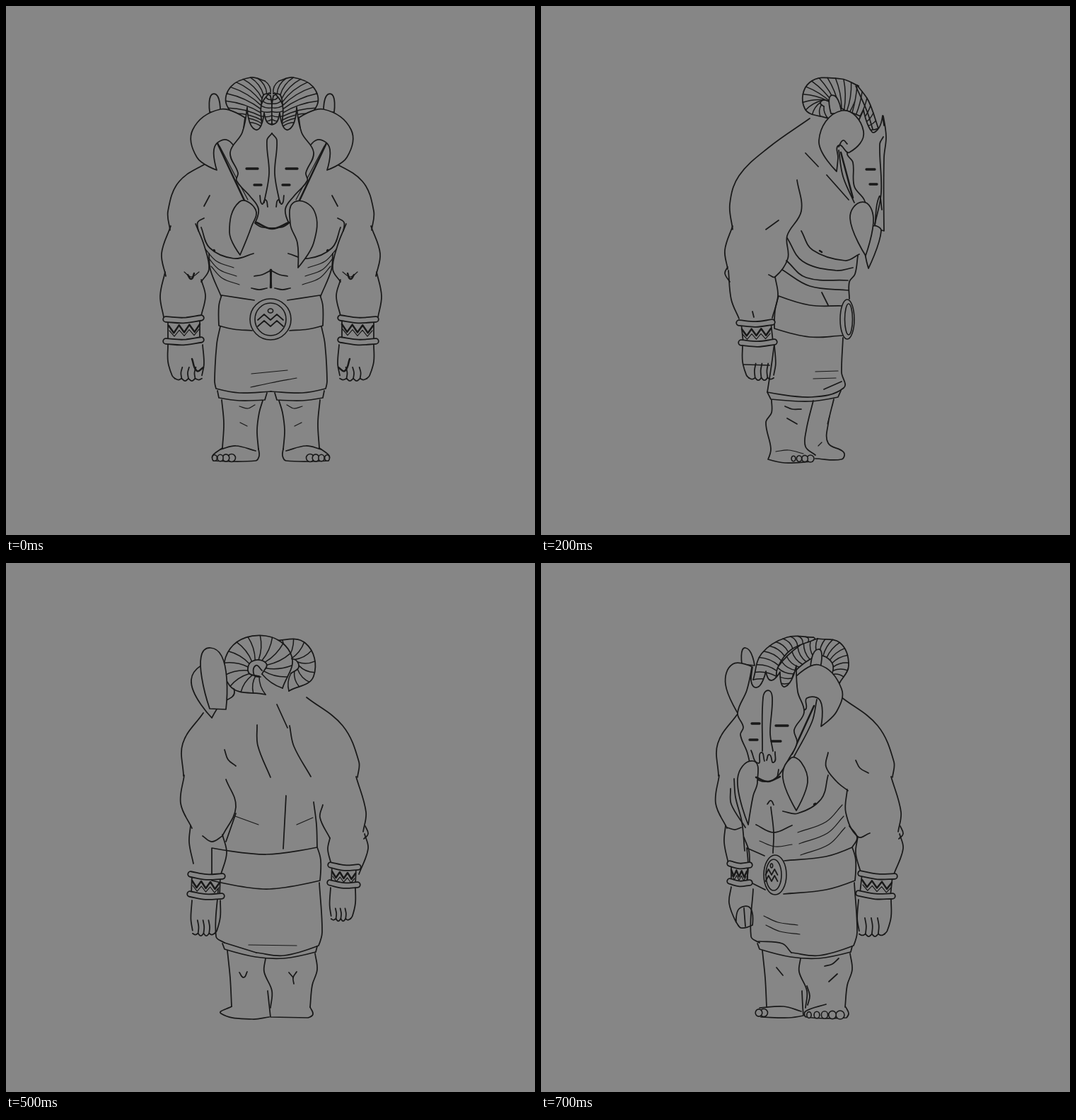
Animation, 748 px wide and 748 px high, one loop 0.8 s. Source, as an HTML page:

```html
<!DOCTYPE html>
<html lang="en">
<head>
<meta charset="utf-8">
<title>Turnaround</title>
<style>
  html, body { margin: 0; width: 100%; height: 100%; overflow: hidden; background: #868686; }
  svg { display: block; width: 100vw; height: 100vh; }
  path { stroke-linecap: round; stroke-linejoin: round; }
</style>
</head>
<body>
<svg id="stage" viewBox="0 0 748 748"></svg>
<script>
const PAPER = "#868686", INK = "#191919";
const THIN = 1.2, PLAIN = 1.75, BOLD = 2.5;
const NS = "http://www.w3.org/2000/svg";
const stage = document.getElementById("stage");
let group, axis = 0;

// "x,y x,y!" where "!" marks a corner
const read = text => text.split(" ").map(w => {
  const [x, y] = w.split(",").map(parseFloat);
  return { x, y, corner: w.endsWith("!") };
});
const flip = pts => pts.map(p => ({ ...p, x: axis - p.x }));
const shift = (pts, dx, dy) => pts.map(p => ({ ...p, x: p.x + dx, y: p.y + dy }));
const at = (x, y) => ({ x, y, corner: true });

function spline(pts, closed) {
  const n = pts.length;
  const get = i => closed ? pts[(i + n) % n] : pts[Math.max(0, Math.min(n - 1, i))];
  const handle = (i, len) => {
    const a = get(i - 1), b = get(i + 1);
    const k = get(i).corner ? 0 : len * 0.36 / (Math.hypot(b.x - a.x, b.y - a.y) || 1);
    return [(b.x - a.x) * k, (b.y - a.y) * k];
  };
  let d = `M${pts[0].x} ${pts[0].y}`;
  for (let i = 0; i < (closed ? n : n - 1); i++) {
    const p = get(i), q = get(i + 1), len = Math.hypot(q.x - p.x, q.y - p.y);
    const [ax, ay] = handle(i, len), [bx, by] = handle(i + 1, len);
    d += `C${p.x + ax} ${p.y + ay} ${q.x - bx} ${q.y - by} ${q.x} ${q.y}`;
  }
  return closed ? d + "Z" : d;
}

function add(d, width, fill = "none", stroke = INK) {
  const path = document.createElementNS(NS, "path");
  const attrs = { d, fill, stroke, "stroke-width": width };
  for (const key in attrs) path.setAttribute(key, attrs[key]);
  group.append(path);
  return path;
}

function trace(pts, width = PLAIN, closed = false) {
  for (const p of axis ? [pts, flip(pts)] : [pts])
    add(spline(p, closed), width, closed ? PAPER : "none");
}
const line = (text, width) => trace(read(text), width);
const lines = (width, ...texts) => texts.forEach(t => line(t, width));
const shape = text => trace(read(text), PLAIN, true);
const eye = (x, y, w) => trace([at(x, y), at(x + w, y)], 3.3);

// closed outline made of one half and its reflection
function whole(text) {
  const half = read(text);
  add(spline([...half, ...flip(half).reverse()], true), PLAIN, PAPER);
}

function repeat(count, dx, dy, text, width = THIN) {
  for (let i = 0; i < count; i++) trace(shift(read(text), dx * i, dy * i), width);
}

function oval(x, y, rx, ry) {
  for (const cx of axis ? [x, axis - x] : [x])
    add(`M${cx - rx} ${y}a${rx} ${ry} 0 1 1 ${2 * rx} 0a${rx} ${ry} 0 1 1 ${-2 * rx} 0Z`, 1.6, PAPER);
}

function toes(x, y, step, count, size) {
  for (let i = 0; i < count; i++) oval(x + step * i, y, size - i * 0.7, size - i * 0.4);
}

function zigzag(x, y, w, h, peaks, tilt = 0, width = BOLD) {
  const pts = [];
  for (let i = 0; i <= peaks * 2; i++)
    pts.push(at(x + w * i / peaks / 2, y + (i % 2 ? h : 0) + tilt * i / peaks / 2));
  trace(pts, width);
}

function tube(x, y, w, tilt) {
  const pts = [{ x, y }, { x: x + w / 2, y: y + tilt / 2 + 2.5 }, { x: x + w, y: y + tilt }];
  for (const p of axis ? [pts, flip(pts)] : [pts]) {
    add(spline(p), 9.4);
    add(spline(p), 5.8, "none", PAPER);
  }
}

function bracelet(x, y, w, tilt, gap, lean) {
  trace([at(x + 3, y), at(x + 3 + lean, y + gap)]);
  trace([at(x + w - 2, y + tilt), at(x + w - 2 + lean, y + gap + tilt)]);
  zigzag(x + 4, y + 9, w - 6, gap * 0.34, 3, tilt);
  zigzag(x + 5, y + 16, w - 8, gap * 0.27, 3, tilt, THIN);
  tube(x, y, w, tilt);
  tube(x + lean, y + gap, w, tilt);
}

function hand(x, y, w, h, crease = 0.3) {
  const pt = (u, v) => ({ x: x + u * w, y: y + v * h });
  trace([pt(0, 0), pt(0, 0.45), pt(0.12, 0.82), pt(0.2, 0.9)]);
  trace([pt(1, 0), pt(1.04, 0.5), pt(0.98, 0.82)]);
  for (let i = 0; i < 4; i++) {
    const u = 0.2 + 0.195 * i, drop = 0.98 - Math.abs(i - 1.5) * 0.03;
    trace([pt(u, 0.9), pt(u + 0.1, drop), pt(u + 0.195, 0.9)]);
    if (i) trace([pt(u, 0.9), pt(u - 0.02, 0.9 - crease / 2), pt(u + 0.02, 0.9 - crease)]);
  }
}

function buckle(x, y, rx, ry, rim) {
  oval(x, y, rx, ry);
  oval(x + (rx < 20 ? 2 : 0), y, rx - rim, ry - 6);
}

function emblem(x, y, w) {
  oval(x, y - 13, w / 10, 3);
  for (const dy of [-4, 5]) zigzag(x - w / 2, y + dy + 4, w, -8, 2, 0, PLAIN);
}

// ribbed horn between two edges
function braid(left, right, count, bulge) {
  for (const side of axis ? [1, -1] : [1]) {
    const edges = [left, right].map(t => spline(side > 0 ? read(t) : flip(read(t))));
    const body = add("", 0, PAPER, "none");
    const [a, b] = edges.map(d => add(d, PLAIN));
    const on = (path, u) => path.getPointAtLength(path.getTotalLength() * u);
    const near = [], far = [];
    for (let i = 0; i <= count; i++) {
      const p = on(a, i / count), q = on(b, i / count);
      const dx = q.x - p.x, dy = q.y - p.y, k = side * bulge / (Math.hypot(dx, dy) || 1);
      add(`M${p.x} ${p.y}Q${(p.x + q.x) / 2 - dy * k} ${(p.y + q.y) / 2 + dx * k} ${q.x} ${q.y}`, 1.5);
      near.push(`${p.x} ${p.y}`);
      far.unshift(`${q.x} ${q.y}`);
    }
    body.setAttribute("d", "M" + near.concat(far).join("L") + "Z");
  }
}

function front() {
  axis = 749;
  lines(PLAIN, "276,313 288,342 322,357 350,350", "287,350 289,373 304,410",
    "347,399 358,401 369,399", "351,382 362,380 374,374");
  repeat(3, 4, 12, "282,344 298,361 322,370");
  line("294,345 295,346", BOLD);
  line("374,373 375,398", BOLD);
  lines(PLAIN, "351,416 305,409! 301,424 301,452! 322,457 348,459",
    "303,453 298,478 295,530 297,541! 330,547 375,545",
    "299,544 301,554! 330,558 366,557! 369,547");
  // legs
  lines(PLAIN, "305,557 308,590 306,625", "363,558 358,575 355,600 357,627",
    "306,625 292,636 293,643! 353,643 358,636 357,626", "303,627 325,622 353,629");
  lines(THIN, "330,566 342,569 352,564", "331,589 341,594");
  toes(319, 639, -8, 4, 5.5);
  // arms
  lines(PLAIN, "291,218 245,248 229,290 232,317", "233,311 220,350 226,382",
    "225,376 218,410 223,440", "268,308 280,338 287,372 276,390",
    "276,387 282,410 276,438", "272,318 271,306 280,300", "288,268 280,283");
  line("252,376 262,383 273,376", THIN);
  line("257,380 262,386 266,378", BOLD);
  bracelet(226, 443, 50, -2, 31, 0);
  hand(229, 479, 49, 53);
  line("263,499 270,516 279,511", BOLD);
  axis = 0;
  lines(THIN, "347,520 398,515", "346,539 374,533 411,526");
  buckle(374, 443, 29, 29, 7);
  emblem(374, 444, 36);
  // head
  axis = 752;
  braid("338,165 312,140 318,114 346,101 366,106", "363,172 361,145 364,126 374,124", 11, -6);
  braid("362,170 361,140 372,123", "376,166 376,140 374,127", 7, 3);
  shape("303,150! 294,124 288,150!");
  shape("338,158! 303,146 264,175 270,214 298,232! 295,199 314,190 330,215!");
  line("299,194 314,226 338,277", BOLD);
  line("302,198 342,274", THIN);
  whole("376,168! 369,164 365,151! 353,175 341,143! 334,179 317,207 328,236 326,247 345,269 357,287 352,307! 363,313");
  lines(PLAIN, "376,180 369,190 372,237 365,278", "359,268 362,280 367,274 370,284");
  eye(340, 230, 16);
  eye(351, 253, 10);
  axis = 0;
  line("354,306 376,315 400,306", BOLD);
  shape("331,352! 316,320 330,277 353,288 347,312");
  shape("402,308 408,277 436,290 435,335 413,370! 412,335");
}

// outline common to both three-quarter views
function hull() {
  axis = 0;
  lines(PLAIN, "328,190 277,230 254,281 256,303", "258,302 244,352 248,380",
    "245,372 241,383 247,390", "246,383 241,404 254,440",
    "474,212 503,255 502,301", "501,300 506,340 490,375", "492,371 494,395 488,425",
    "310,452 306,522 311,541! 360,555 399,551", "453,461 456,528 444,537",
    "316,552 313,575 320,597 323,628", "440,548 436,587 434,627",
    "313,542 315,550! 360,559 400,557 444,546! 447,538",
    "386,559 388,578 377,605 379,629");
}

function quarter() {
  hull();
  lines(PLAIN, "347,268 350,288 335,309 319,322", "347,300 357,334 390,354 411,351",
    "424,342 428,336 433,341", "428,345 424,381 425,410", "398,371 424,381 449,370",
    "480,305 478,331 469,366 465,407", "317,372 306,388 313,402");
  repeat(3, -2, 16, "327,342 350,366 390,381");
  lines(THIN, "398,398 422,401 444,393");
  line("365,340 367,341", BOLD);
  lines(PLAIN, "409,421 350,415 313,402! 308,420 309,449! 350,462 410,468",
    "437,414 462,403! 460,430 462,449! 436,462");
  buckle(422, 441, 16, 28, 5);
  emblem(427, 441, 17);
  // legs
  lines(PLAIN, "399,551 412,538 445,535", "384,605 383,626 382,640! 403,643 442,642",
    "377,598 373,612 376,625", "322,628 318,637 321,643! 378,642 379,634 350,624",
    "385,634 410,627 444,629", "332,559 341,567 352,570", "334,581 346,592", "411,583 420,572");
  repeat(2, -3, 13, "390,512 418,508 438,499");
  toes(330, 639, 11, 5, 6);
  toes(438, 636, 7, 2, 5.5);
  // arms
  lines(PLAIN, "320,320 322,353 305,387 288,382", "305,387 308,410 301,437",
    "308,279 302,290 290,297", "485,319 484,341 464,374", "470,374 479,377 490,374",
    "466,388 459,407 458,425");
  bracelet(253, 443, 48, -4, 28, 3);
  hand(258, 476, 46, 54, 0.42);
  bracelet(458, 427, 28, -2, 25, 0);
  lines(PLAIN, "484,458 487,481 477,508! 473,489 457,488 454,512! 470,516 477,508", "466,488 464,514");
  // head
  braid("331,170 318,145 330,113 362,107", "343,163 340,145 350,133 365,130", 9, -4);
  braid("362,107 385,115 418,147 421,168", "362,130 380,141 395,155 399,169", 9, -5);
  braid("368,105 405,105 441,128 453,165", "368,109 400,123 418,147 421,168", 11, 5);
  shape("358,148! 361,122 372,149!");
  shape("451,145! 464,120 469,143!");
  shape("454,147! 482,143 492,172 472,217! 470,198 462,190");
  shape("392,160! 360,144 328,178 335,210 357,231! 358,195 377,191 379,207 388,200");
  line("363,193 370,225 397,277");
  line("367,202 398,270", BOLD);
  shape("392,145! 408,175 415,154! 428,166 435,153! 450,176 455,148! 462,180 475,212 467,232 471,243 462,266 450,303 432,309 417,300 402,276 391,254 395,236 381,211 390,182");
  lines(PLAIN, "425,266 429,240 426,190 432,180 439,190 440,266",
    "422,267 424,282 430,271 434,279", "437,280 442,268 446,283 456,265", "417,292 419,304");
  eye(404, 230, 17);
  eye(444, 227, 11);
  eye(414, 252, 13);
  eye(447, 250, 11);
  shape("385,282 376,310 392,350! 411,304 400,276");
  shape("453,280 475,305 460,370! 453,329 447,310");
  line("415,302 432,309 449,303", BOLD);
}

function side() {
  axis = 0;
  lines(PLAIN, "380,159 322,200 280,240 267,280 271,316", "374,208 392,227",
    "404,239 420,257 435,274", "368,318 384,345 430,360 450,351",
    "348,328 370,361 417,374 441,370", "347,360 375,384 434,388", "341,373 380,396 435,402",
    "448,353 444,379 436,390 436,414", "397,405 406,423",
    "425,424 380,423 336,410! 331,430 330,456! 380,468 426,466");
  line("394,346 397,348", BOLD);
  buckle(433, 443, 10, 28, 4.5);
  // legs
  lines(PLAIN, "330,477 326,507 320,546! 382,553 428,540 425,518 427,469",
    "320,546 325,556! 380,559 420,553! 424,544", "400,542 425,531",
    "326,557 326,575 318,589 325,626 321,641! 345,646 384,644",
    "385,558 375,600 374,623 388,635", "414,556 406,591 406,618 428,631 425,641 388,640",
    "345,566 355,570 368,570", "348,583 362,591");
  repeat(2, -3, 10, "388,517 420,516");
  lines(THIN, "332,630 350,628 371,633", "392,622 397,617", "405,591 408,580");
  toes(381, 640, -8, 4, 5);
  // arm
  lines(PLAIN, "362,246 368,290 348,325 349,357 331,383 322,380", "271,311 260,345 264,372",
    "264,369 260,378 267,390", "265,374 269,415 280,442", "331,383 335,410 327,441",
    "336,303 318,316", "299,432 301,440");
  bracelet(280, 448, 47, -1, 28, 3);
  hand(285, 480, 45, 51, 0.4);
  line("287,507 323,508");
  // head
  braid("406,159 373,145 380,108 424,103 449,113", "400,142 395,137 402,133 436,151", 13, -4);
  braid("447,112 463,134 477,173", "440,151 456,159 465,175", 6, -2);
  line("445,113 461,149 469,174");
  shape("410,152! 412,126 425,152!");
  line("421,204 427,241 443,278");
  line("424,207 441,271", BOLD);
  shape("456,147! 468,178 478,172 483,155! 485,169! 484,156 488,185 485,215 485,318! 468,309 457,274 443,255 441,221 433,208");
  lines(PLAIN, "484,185 479,195 481,264 472,309", "472,311 478,270 482,288");
  eye(460, 231, 12);
  eye(465, 252, 10);
  shape("418,234! 393,190 425,148 456,177 436,207 421,197 420,215");
  line("421,199 427,190 433,195");
  shape("468,312 481,318 463,371! 458,340");
  shape("455,277 437,300 459,353! 470,300");
}

function rear() {
  axis = 748;
  lines(PLAIN, "312,209 255,233 228,285 231,325", "300,338 293,368 305,407",
    "294,265 290,278 281,288", "363,262 362,284 345,320");
  lines(THIN, "300,357 326,370", "301,386 329,386", "326,204 331,196");
  whole("374,408! 301,409! 301,445! 374,447!");
  lines(PLAIN, "301,447 298,480 297,542! 330,548 374,541", "299,545 300,554! 340,559 362,557! 366,546");
  // legs
  lines(PLAIN, "304,558 307,585 305,625! 291,640 300,645 354,644! 354,615 359,606 362,560",
    "340,579 345,586 344,596", "345,586 351,579", "325,607 338,616", "305,625 314,629",
    "313,644 327,641 337,644");
  // arms
  lines(PLAIN, "231,318 220,350 225,383", "224,378 217,405 225,445",
    "302,337 293,363 275,396", "275,391 280,414 276,440", "236,387 247,396 260,389");
  line("238,374 239,379", BOLD);
  lines(THIN, "246,434 244,446", "254,431 253,443");
  bracelet(225, 450, 50, -5, 27, 2);
  hand(227, 481, 51, 50, 0.36);
  lines(PLAIN, "246,492 243,507", "262,488 269,499 266,508", "236,512 272,507");
  axis = 0;
  lines(PLAIN, "374,186 373,225", "374,255 374,270", "333,541 414,541");
  line("374,333 374,404", BOLD);
  line("345,530 383,535", THIN);
  // head
  axis = 748;
  lines(PLAIN, "289,149 261,185 274,221", "299,200 292,206 294,216");
  shape("300,212! 288,150 296,126 307,165 314,207!");
  braid("310,148 318,112 345,102 374,132 356,181 312,178 306,155",
    "334,148 336,127 341,143 334,162 318,154", 17, 5);
  lines(PLAIN, "313,159 318,149 323,159 317,164", "304,155 314,136");
}

function rearQuarter() {
  hull();
  lines(PLAIN, "352,230 346,259 322,302", "398,229 397,258 379,303", "370,200 355,233",
    "357,329 361,404", "318,338 314,370 313,402", "428,354 442,394");
  lines(THIN, "319,360 342,370", "396,370 429,358", "342,541 410,540");
  shape("313,402! 308,420 309,449! 385,461 462,449! 462,403! 385,412");
  // legs
  lines(PLAIN, "399,551 444,537", "323,628 319,638 326,643! 379,642! 383,605",
    "381,642 405,645 449,637 434,627", "342,578 347,586 346,595", "347,586 353,579",
    "412,578 417,586 423,579");
  // arms
  lines(PLAIN, "305,342 309,360 295,389", "295,389 298,405 293,426",
    "444,264 439,278 428,287", "442,306 428,345 447,386", "447,384 441,410 449,440",
    "447,386 462,394 475,386");
  bracelet(255, 430, 39, -3, 25, 1);
  hand(259, 459, 35, 49);
  bracelet(447, 443, 45, -3, 28, 1);
  hand(450, 477, 40, 52, 0.36);
  // head
  shape("358,148! 361,122 372,149!");
  shape("430,182 455,141 491,165 462,219! 450,200");
  braid("353,181 318,160 330,113 378,110", "350,156 339,147 346,136 366,140", 9, 5);
  braid("362,177 349,132 386,103 436,121 437,173 386,186",
    "391,157 385,142 405,139 410,155 395,160", 15, 5);
  line("391,152 400,145 402,159 393,161");
  shape("442,207! 464,120 465,206!");
}

function build(draw, mirror) {
  group = document.createElementNS(NS, "g");
  stage.append(group);
  if (mirror) group.setAttribute("transform", `translate(${mirror} 0) scale(-1 1)`);
  draw();
  group.style.display = "none";
  return group;
}

const poses = [
  build(front), build(quarter), build(side), build(rearQuarter),
  build(rear), build(rearQuarter, 753), build(side, 748), build(quarter, 753),
];

const STEP = 100;
let shown = null;
function tick() {
  const pose = poses[Math.floor(performance.now() / STEP) % poses.length];
  if (pose !== shown) {
    if (shown) shown.style.display = "none";
    pose.style.display = "";
    shown = pose;
  }
  requestAnimationFrame(tick);
}
tick();
</script>
</body>
</html>
```
